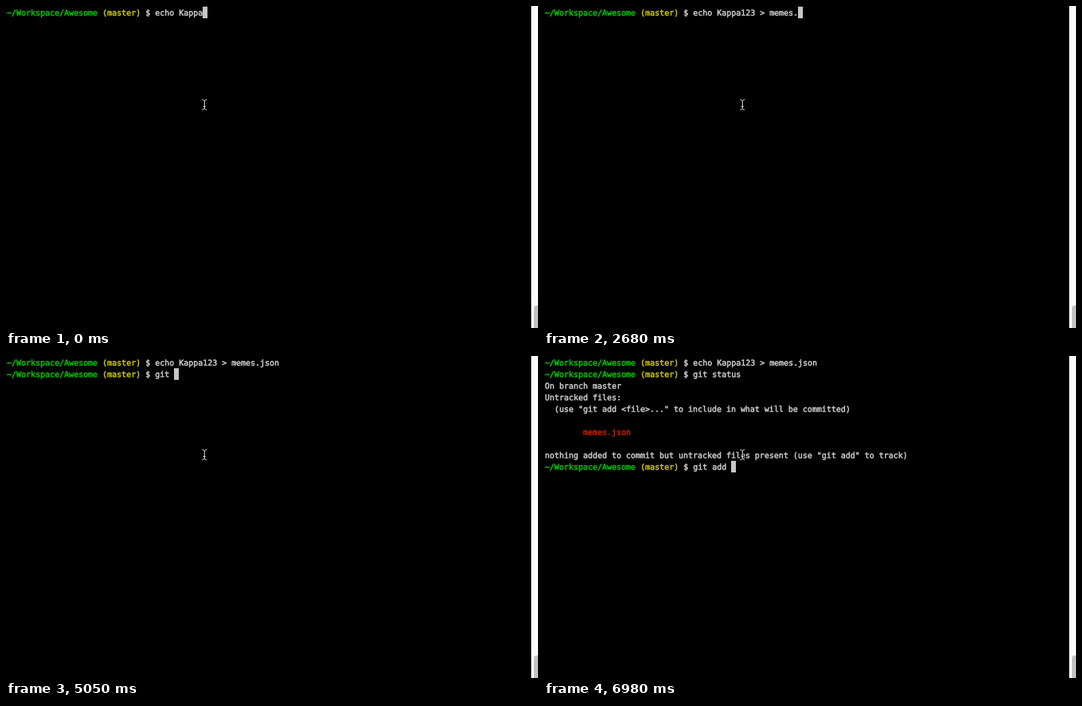
Write an HTML page that moves like this. It is 779 px wide and 473 px high and loops after 8 s.

```html
<!DOCTYPE html>
<html lang="en">
<head>
<meta charset="utf-8">
<title>Terminal</title>
<style>
  html, body { margin: 0; width: 100%; height: 100%; overflow: hidden; background: #000; }
  svg { display: block; width: 779px; height: 473px; }
  text {
    font: 11.627px "DejaVu Sans Mono", monospace;
    white-space: pre;
    text-rendering: geometricPrecision;
    fill: #c7c7c7;
    stroke: #c7c7c7;
    stroke-width: .6px;
  }
  .path { fill: #00c200; stroke: #00c200; }
  .branch { fill: #c7c400; stroke: #c7c400; }
  .file { fill: #c91b00; stroke: #c91b00; }
</style>
</head>
<body>
<svg viewBox="0 0 779 473">
  <defs>
    <path id="beam" d="M287.5 137.5Q290.5 137.5 290.5 140V150Q290.5 152.5 287.5 152.5M293.5 137.5Q290.5 137.5 290.5 140M290.5 150Q290.5 152.5 293.5 152.5M289 147.5H292"/>
  </defs>
  <rect width="779" height="473"/>
  <g id="screen"></g>
  <rect id="caret" width="7" height="17" fill="#c7c7c7"/>
  <g fill="none" stroke-linecap="round">
    <use href="#beam" stroke="#000" stroke-width="2.4"/>
    <use href="#beam" stroke="#e8e8e8"/>
  </g>
  <rect x="769" width="10" height="473" fill="#fafafa"/>
  <rect x="769" width="1" height="473" fill="#e8e8e8"/>
  <rect x="773" y="440" width="12" height="40" rx="4" fill="#c1c1c1"/>
</svg>
<script>
const LOOP = 8000, BEAT = 145;
const CELL = 7, LINE = 17;
const PROMPT = [['~/Workspace/Awesome ', 'path'], ['(master) ', 'branch'], ['$ ']];
const PROMPT_COLS = PROMPT.reduce((sum, [string]) => sum + string.length, 0);
const OUTPUT = [
  ['On branch master'],
  ['Untracked files:'],
  ['  (use "git add <file>..." to include in what will be committed)'],
  [''],
  ['        memes.json', 'file'],
  [''],
  ['nothing added to commit but untracked files present (use "git add" to track)']
];

// Bursts of typing by start time; "|" waits one beat between keys.
const COMMANDS = [
  { row: 0, at: 0, bursts: {
    0: 'echo Kappa', 140: '12|3', 740: ' |>', 1180: ' |m|e|m|e',
    2230: 's', 2680: '.', 3120: 'j', 3570: 's|o|n' } },
  { row: 1, at: 4160, bursts: { 4760: 'gi|t| |s|ta|t|us' } },
  { row: 9, at: 5780, bursts: { 5930: 'gi|t| a|d', 6680: 'd', 6980: ' ' } }
];
const OUTPUT_AT = COMMANDS[2].at;

const SVG = 'http://www.w3.org/2000/svg';
const screen = document.getElementById('screen');
const caret = document.getElementById('caret');

function addText(parent, row, col, string, cls) {
  const el = document.createElementNS(SVG, 'text');
  el.setAttribute('x', 1.3 + col * CELL);
  el.setAttribute('y', 14 + row * LINE);
  if (cls) el.setAttribute('class', cls);
  el.textContent = string;
  parent.append(el);
  return el;
}

function addGroup() {
  const group = document.createElementNS(SVG, 'g');
  screen.append(group);
  return group;
}

function show(el, on) {
  el.setAttribute('visibility', on ? 'visible' : 'hidden');
}

function typedAt(bursts, t) {
  return Object.entries(bursts).map(([start, keys]) => {
    const beats = Math.floor((t - start) / BEAT) + 1;
    return keys.split('|').slice(0, Math.max(0, beats)).join('');
  }).join('');
}

for (const cmd of COMMANDS) {
  cmd.group = addGroup();
  let col = 0;
  for (const [string, cls] of PROMPT) {
    addText(cmd.group, cmd.row, col, string, cls);
    col += string.length;
  }
  cmd.typed = addText(cmd.group, cmd.row, PROMPT_COLS, '');
}

const output = addGroup();
OUTPUT.forEach(([string, cls], i) => {
  const body = string.trimStart();
  addText(output, i + 2, string.length - body.length, body, cls);
});

function render(t) {
  for (const { row, at, bursts, group, typed } of COMMANDS) {
    show(group, t >= at);
    if (t < at) continue;
    const text = typedAt(bursts, t);
    typed.textContent = text;
    caret.setAttribute('x', 1 + (PROMPT_COLS + text.length) * CELL);
    caret.setAttribute('y', 1 + row * LINE);
  }
  show(output, t >= OUTPUT_AT);
}

const start = performance.now();
function tick() {
  render((performance.now() - start) % LOOP);
  requestAnimationFrame(tick);
}
tick();
</script>
</body>
</html>
```
